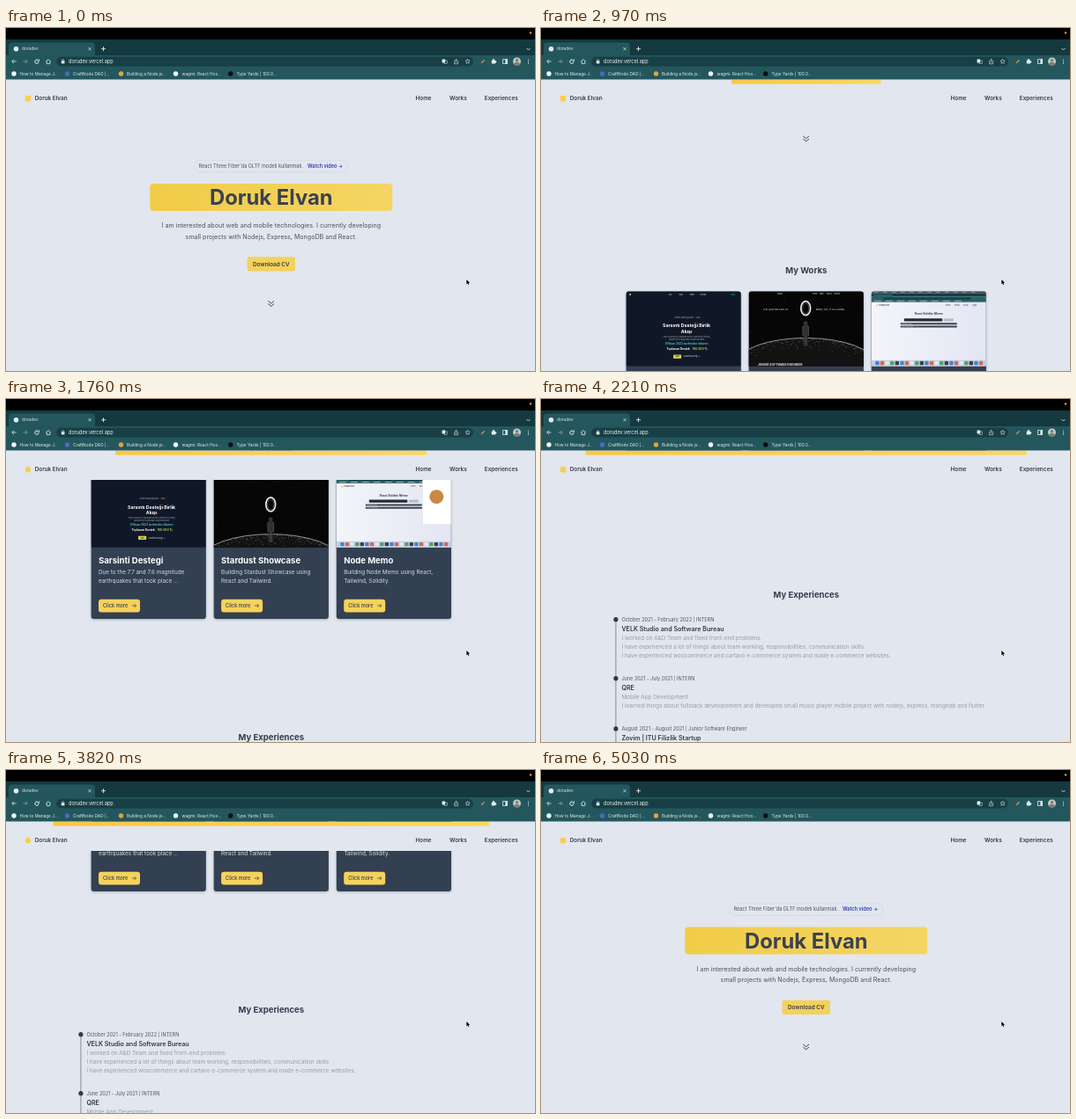
Write an HTML page with a canvas that moves like this. It is 600 by 390 pixels and loops after 5.06 s.

```html
<!DOCTYPE html>
<html lang="en">
<head>
<meta charset="utf-8">
<title>Portfolio scroll</title>
<style>
html, body { margin: 0; width: 100%; height: 100%; overflow: hidden; background: #e1e6ef; }
canvas { display: block; width: 600px; height: 390px; }
</style>
</head>
<body>
<canvas id="stage"></canvas>
<script>
const W = 600, H = 390, LOOP = 5060, CX = 300.8, MAX = 660;
const canvas = document.getElementById('stage');
const g = canvas.getContext('2d');
const dpr = window.devicePixelRatio || 1;
canvas.width = W * dpr;
canvas.height = H * dpr;

const BG = '#e1e6ef', INK = '#343d4d', SLATE = '#334052', YELLOW = '#f6d25b';
const K = 600 / 1512; // page pixels to stage pixels
const XS = 12 * K, SM = 14 * K, MD = 16 * K, LG = 18 * K, XL = 24 * K, HUGE = 60 * K;

// Monotone cubic through [time, value] points
function track(pts) {
  const n = pts.length;
  const d = pts.slice(1).map((p, i) => (p[1] - pts[i][1]) / (p[0] - pts[i][0]));
  const m = pts.map((p, i) => {
    if (i === 0 || i === n - 1) return 0;
    const a = d[i - 1], b = d[i];
    return a * b <= 0 ? 0 : 2 * a * b / (a + b);
  });
  return t => {
    if (t <= pts[0][0]) return pts[0][1];
    if (t >= pts[n - 1][0]) return pts[n - 1][1];
    let i = 0;
    while (t > pts[i + 1][0]) i++;
    const h = pts[i + 1][0] - pts[i][0], u = (t - pts[i][0]) / h, v = 1 - u;
    return pts[i][1] * (1 + 2 * u) * v * v + m[i] * h * u * v * v +
      pts[i + 1][1] * u * u * (3 - 2 * u) - m[i + 1] * h * u * u * v;
  };
}

const scrollAt = track([
  [0, 0], [60, 0], [300, 45], [550, 128], [800, 180], [925, 186], [970, 187.5],
  [1150, 250], [1315, 291.5], [1360, 301], [1550, 340], [1900, 451], [2165, 550],
  [2210, 565], [2400, 615], [2600, 634], [2850, 639], [3000, 648], [3150, 659],
  [3300, 662], [3450, 657], [3600, 625], [3775, 544.5], [3820, 516], [4000, 385],
  [4200, 195], [4360, 62], [4400, 40], [4500, 8], [4600, -4], [4700, -5], [5030, -1.5], [5060, -1]
]);

const roundAt = track([
  [0, .06], [350, 1], [650, 1], [900, 0], [970, 0], [1360, .93], [1800, 1], [2210, .07],
  [2500, .9], [2850, .96], [3150, 0], [3400, 0], [3820, .95], [4200, 1], [4500, 0], [4700, 0], [5030, .4]
]);

function txt(s, x, y, size, weight, color, align = 'left') {
  g.font = `${weight} ${size}px Inter, "Open Sans", sans-serif`;
  g.textAlign = align;
  g.fillStyle = color;
  g.fillText(s, x, y + size * .36); // y is the middle of the capitals
}

function rect(x, y, w, h, color) {
  g.fillStyle = color;
  g.fillRect(x, y, w, h);
}

function box(x, y, w, h, r, color) {
  g.beginPath();
  g.roundRect(x, y, w, h, r);
  g.fillStyle = color;
  g.fill();
}

function dot(x, y, r, color) {
  g.beginPath();
  g.arc(x, y, r, 0, 7);
  g.fillStyle = color;
  g.fill();
}

function line(color, width, ...paths) {
  g.strokeStyle = color;
  g.lineWidth = width;
  g.beginPath();
  for (const p of paths)
    for (let i = 0; i < p.length; i += 2) i ? g.lineTo(p[i], p[i + 1]) : g.moveTo(p[0], p[1]);
  g.stroke();
}

function ring(x, y, rx, ry, color, width) {
  g.beginPath();
  g.ellipse(x, y, rx, ry, 0, 0, 7);
  g.strokeStyle = color;
  g.lineWidth = width;
  g.stroke();
}

function ramp(x0, x1, a, b) {
  const c = g.createLinearGradient(x0, 0, x1, 0);
  c.addColorStop(0, a);
  c.addColorStop(1, b);
  return c;
}

function random(seed) {
  return () => (seed = seed * 16807 % 2147483647) / 2147483647;
}

function browser() {
  const strip = '#14393f', bar = '#23575d', light = '#e4eeee';
  rect(0, 0, W, 13, '#000');
  dot(595, 5.5, 1.2, '#e9963a');
  rect(0, 13, W, 18, strip);
  rect(0, 31, W, 27.5, bar);
  box(3, 16.5, 98, 16, 4, bar);
  dot(11.5, 23.7, 2.8, light);
  txt('dorudev', 18, 23.7, XS, 400, light);
  line(light, .7, [93.4, 22.1, 96.6, 25.3], [96.6, 22.1, 93.4, 25.3]);
  line(light, .9, [108, 23.7, 113, 23.7], [110.5, 21.2, 110.5, 26.2]);
  line(light, .8, [590.5, 23, 592.5, 25, 594.5, 23]);

  line(light, .8, [11.5, 38, 6.8, 38], [9, 35.8, 6.8, 38, 9, 40.2]);
  line('#86a6a9', .8, [19.5, 38, 24.2, 38], [22, 35.8, 24.2, 38, 22, 40.2]);
  g.beginPath();
  g.arc(35, 38.2, 2.2, -.4, 5.2);
  g.stroke();
  line(light, .8, [37.6, 35.4, 37.4, 37.4, 35.4, 37.4]);
  g.beginPath();
  g.arc(35, 38.2, 2.2, .3, 5.4);
  g.stroke();
  line(light, .8, [45.2, 38.2, 48, 35.6, 50.8, 38.2], [46.2, 37.6, 46.2, 40.6, 49.8, 40.6, 49.8, 37.6]);

  box(57, 32.8, 473, 10.8, 5.4, '#173f45');
  rect(62.8, 37.4, 3.6, 3, light);
  ring(64.6, 37.2, 1.1, 1.5, light, .6);
  txt('dorudev.vercel.app', 71, 38.1, SM, 400, '#f0f6f6');
  box(494.6, 35.6, 3.6, 4, .5, light);
  g.strokeStyle = light;
  g.lineWidth = .5;
  g.strokeRect(497, 37, 3.2, 3.6);
  line(light, .6, [509.4, 37.4, 508.6, 37.4, 508.6, 40.8, 512.6, 40.8, 512.6, 37.4, 511.8, 37.4],
    [510.6, 39.4, 510.6, 35.4], [509.4, 36.5, 510.6, 35.3, 511.8, 36.5]);
  g.beginPath();
  for (let i = 0; i < 11; i++) {
    const r = i % 2 ? 1.3 : 2.7, a = i * Math.PI / 5 - Math.PI / 2;
    g.lineTo(523.6 + r * Math.cos(a), 38.1 + r * Math.sin(a));
  }
  g.stroke();
  line('#e8934a', 1.3, [539.2, 39.8, 542.6, 36.4]);
  box(550.8, 36.4, 4.4, 4.2, .5, light);
  dot(553, 36.1, 1, light);
  dot(555.4, 38.5, 1, light);
  g.strokeStyle = light;
  g.lineWidth = .8;
  g.strokeRect(563.6, 35.7, 5, 4.8);
  rect(566.4, 35.7, 2.2, 4.8, light);
  g.save();
  g.beginPath();
  g.arc(579.5, 38, 4.5, 0, 7);
  g.clip();
  rect(574, 33, 11, 11, '#bccbc9');
  dot(579.5, 36.7, 1.7, '#87796d');
  dot(579.5, 42.4, 3.6, '#87796d');
  g.restore();
  for (const y of [36, 38.1, 40.2]) dot(592.5, y, .6, light);

  const marks = [
    [9, 15.5, '#f4f6f6', 'How to Manage J...'],
    [69.5, 76, '#4f68c0', 'CraftNode DAO |...'],
    [130.5, 137, '#e0a33d', 'Building a Node.js...'],
    [192.5, 199.5, '#f4f6f6', 'wagmi: React Hoo...'],
    [254.7, 261.5, '#0b0f10', 'Type Yards | 100.0...']
  ];
  for (const [ix, x, c, s] of marks) {
    dot(ix, 52, 2.7, c);
    txt(s, x, 52, XS, 400, light);
  }
}

function hero() {
  g.beginPath();
  g.roundRect(213.5, 150.3, 174.5, 13.6, 6.8);
  g.strokeStyle = '#cbd2dd';
  g.lineWidth = .5;
  g.stroke();
  txt("React Three Fiber'da GLTF modeli kullanmak.", 218.5, 157, SM, 400, '#4c5564');
  txt('Watch video →', 342, 157, SM, 600, '#3040b4');
  box(163.3, 177, 275, 31, 4, ramp(163, 438, '#f1cc48', '#f4d564'));
  txt('Doruk Elvan', CX, 192.6, HUGE, 700, '#3a4250', 'center');
  txt('I am interested about web and mobile technologies. I currently developing', CX, 224.5, LG, 400, '#4a5362', 'center');
  txt('small projects with Nodejs, Express, MongoDB and React.', CX, 237.3, LG, 400, '#4a5362', 'center');
  box(273.6, 260.2, 54.4, 16.4, 2.4, '#f3d15c');
  txt('Download CV', CX, 268.4, MD, 600, INK, 'center');
  line('#2f3642', .9, [297.4, 310.4, 300.7, 313.2, 304, 310.4], [297.4, 313.6, 300.7, 316.4, 304, 313.6]);
}

function reliefShot() {
  rect(0, 0, 130, 86, '#101827');
  dot(4.5, 3.5, 1, '#cbd2da');
  ['Ana', 'Ekip', 'Yayın', 'Destek'].forEach((s, i) => txt(s, 48 + i * 12, 3.4, 2, 500, '#c4ccd5'));
  txt('Giriş', 119, 3.4, 2, 500, '#36b3b6');
  txt('Birlikte daha güçlüyüz', 66, 29.6, 2.1, 400, '#a7b0bc', 'center');
  txt('canlı', 79, 29.6, 2.1, 500, '#d98143');
  txt('Sarsıntı Desteği Birlik', 68.5, 39, 5.2, 700, '#fff', 'center');
  txt('Akışı', 68.5, 45.4, 5.2, 700, '#fff', 'center');
  txt('Yayın boyunca toplanan bütün destekler ihtiyaç', 68.5, 51.6, 2.4, 400, '#97a1af', 'center');
  txt('sahiplerine doğrudan ulaştırılacaktır', 68.5, 54.6, 2.4, 400, '#97a1af', 'center');
  txt('9 Nisan 2023 tarihinden itibaren', 68.5, 59.6, 3.1, 700, '#4cc3cc', 'center');
  txt('Toplanan Destek:', 46, 65.4, 3.2, 700, '#fff');
  txt('100.000 TL', 75, 65.4, 3.2, 700, '#b9d552');
  box(53.5, 72, 9, 4.4, .6, '#e3d34e');
  txt('Katıl', 58, 74.2, 2, 600, '#222', 'center');
  txt('Daha fazla bilgi →', 65, 74.2, 2.2, 500, '#c4ccd5');
}

function spaceShot(t) {
  const d = 17 * Math.min(1, Math.max(0, (t - 970) / 390));
  rect(0, 0, 130, 86, '#060606');
  const rnd = random(77);
  for (let i = 0; i < 60; i++) rect(rnd() * 130, rnd() * 70, .45, .45, '#777');
  txt('Studio', 32, 3.2, 2, 500, '#ccc');
  ['Home', 'Skills', 'Works', 'Contact'].forEach((s, i) => txt(s, 72 + i * 8, 3.2, 2, 500, '#ccc'));
  if (d < 8) {
    txt('THE QUIETER SIDE OF', 16, 20.6, 2.7, 600, '#aaa');
    txt('MIND, YET, IT IS LOUDER', 76, 20.6, 2.7, 600, '#aaa');
  }
  g.save();
  g.translate(0, d);
  g.beginPath();
  g.ellipse(64.5, 82, 78, 29, 0, 0, 7);
  g.fillStyle = '#121212';
  g.fill();
  g.beginPath();
  g.ellipse(64.5, 82, 78, 29, 0, Math.PI * 1.13, Math.PI * 1.87);
  g.strokeStyle = '#b5b5b5';
  g.lineWidth = .8;
  g.stroke();
  for (let i = 0; i < 180; i++) {
    const x = rnd() * 130, q = (x - 64.5) / 78;
    const top = 82 - 29 * Math.sqrt(1 - q * q);
    rect(x, top + rnd() * rnd() * 15, .6, .5, '#a0a0a0');
  }
  ring(64.5, 19.2, 5.4, 8, '#e9e9e9', 1.7);
  ring(64.5, 19.2, 3.6, 6, '#777', .6);
  dot(64.5, 36.2, 2.4, '#343434');
  box(61.2, 38.5, 6.6, 12, 2, '#303030');
  rect(62.2, 49, 2, 13.2, '#303030');
  rect(65, 49, 2, 13.2, '#303030');
  line('#8a8a8a', .4, [61.2, 51, 61.2, 40, 63, 38.5], [67.8, 51, 67.8, 40, 66, 38.5], [64.6, 50, 64.6, 62]);
  g.restore();
  if (d < 8) txt('JUNIOR SOFTWARE ENGINEER', 10, 83.8, 3.4, 700, '#e6e6e6');
}

function todoShot(t) {
  rect(0, 0, 130, 86, ramp(0, 130, '#f4f5fa', '#e3e6f3'));
  rect(0, 0, 130, 2.2, '#39414c');
  rect(0, 2.2, 130, 4, '#173f45');
  rect(0, 6.2, 130, 6, '#286067');
  box(2, 3.2, 22, 4, .8, '#286067');
  box(13, 7, 100, 2.3, 1.1, '#173f45');
  for (let i = 0; i < 12; i++) rect(3 + i * 10, 1, 5, .5, '#b5bdc4');
  for (let i = 0; i < 8; i++) rect(3 + i * 13, 10.4, 8, .7, '#b9cccd');
  dot(6.5, 16, .9, '#e9c649');
  txt('Doruk Elvan', 8.5, 16, 2, 600, '#444');
  ['Home', 'Works', 'About', 'Login'].forEach((s, i) => txt(s, 84 + i * 10, 16, 2, 500, '#555'));
  txt('React Solidity Memo', 65, 25.8, 3.2, 700, '#333b49', 'center');
  box(37, 30.8, 43.5, 3.2, .6, '#252b35');
  box(82, 30.8, 11, 3.2, .6, '#b6bdca');
  box(33, 35.8, 64, 2, .5, '#3a4250');
  box(33, 39, 64, 2, .5, '#3a4250');
  txt('Read the notes', 35, 36.8, 1.6, 400, '#ddd');
  txt('Buy some bread', 35, 40, 1.6, 400, '#ddd');
  rect(0, 78.2, 130, 7, '#c6ccdd');
  for (let i = 0; i < 22; i++)
    box(4.5 + i * 5.6, 79.4, 4.3, 4.3, 1, ['#3e82d8', '#e3e7ec', '#38414d', '#d8684d', '#4ba36d'][i * 3 % 5]);
  if (t > 1150) {
    box(97.5, 6, 32.5, 53, .8, '#fff');
    g.strokeStyle = '#cfd3da';
    g.lineWidth = .4;
    g.strokeRect(97.5, 6, 32.5, 53);
    dot(113.5, 27.5, 8, '#c98843');
    txt('...', 120, 53, 2.4, 500, '#888', 'center');
  }
}

const cards = [
  [96.6, reliefShot, 'Sarsinti Destegi', 'Due to the 7.7 and 7.6 magnitude', 'earthquakes that took place ...'],
  [235.7, spaceShot, 'Stardust Showcase', 'Building Stardust Showcase using', 'React and Tailwind.'],
  [374.8, todoShot, 'Node Memo', 'Building Node Memo using React,', 'Tailwind, Solidity.']
];

function works(t) {
  txt('My Works', CX, 463.6, XL, 700, INK, 'center');
  for (const [x, shot, title, a, b] of cards) {
    g.save();
    g.translate(x, 487);
    g.shadowColor = 'rgba(30,40,60,.3)';
    g.shadowBlur = 3 * dpr;
    g.shadowOffsetY = dpr;
    box(0, 0, 130.2, 166.4, 3, SLATE);
    g.shadowColor = 'transparent';
    g.save();
    g.beginPath();
    g.roundRect(0, 0, 130.2, 85, [3, 3, 0, 0]);
    g.clip();
    shot(t);
    g.restore();
    txt(title, 8.4, 99.8, XL, 700, '#fff');
    txt(a, 8.4, 113.5, MD, 400, '#d3d9e1');
    txt(b, 8.4, 123.5, MD, 400, '#d3d9e1');
    box(8.4, 144, 47, 14.8, 3, YELLOW);
    txt('Click more', 13.4, 151.4, SM, 500, INK);
    line(INK, .7, [46.2, 151.4, 51, 151.4], [49, 149.4, 51, 151.4, 49, 153.4]);
    g.restore();
  }
}

const jobs = [
  [816, 'October 2021 - February 2022 | INTERN', 'VELK Studio and Software Bureau',
    'I worked on A&D Team and fixed front-end problems.',
    'I have experienced a lot of things about team working, responsibilities, communication skills',
    'I have experienced woocommerce and cartavo e-commerce system and made e-commerce websites.'],
  [883, 'June 2021 - July 2021 | INTERN', 'QRE',
    'Mobile App Development',
    'I learned things about fullstack developement and developed small music player mobile project with nodejs, express, mongodb and flutter'],
  [940.2, 'August 2021 - August 2021 | Junior Software Engineer', 'Zovim | ITU Filizlik Startup',
    'Machine Learning Research with NVC ModelYard',
    'Mobile App Development with React Native, Nimbor Web Services (NVC Relay52, Liftora)']
];

function experiences() {
  txt('My Experiences', CX, 787.6, XL, 700, INK, 'center');
  line('#6d7480', .8, [84.9, 816, 84.9, 992]);
  for (const [y, date, title, ...rows] of jobs) {
    dot(84.9, y, 2.6, '#333a47');
    txt(date, 91.4, y, SM, 400, '#505866');
    txt(title, 91.4, y + 10.5, LG, 600, '#333b49');
    rows.forEach((s, i) => txt(s, 91.4, y + 21 + i * 9.9, MD, 400, '#979eaa'));
  }
}

function nav(t) {
  const w = Math.min(1, Math.max(0, scrollAt(t - 45) / MAX)) * W;
  rect(0, 58.5, W, 33.5, BG);
  if (w > 0) rect(CX - w / 2, 58.7, w, 5, ramp(CX - w / 2, CX + w / 2, '#fac646', '#fdd660'));
  const r = roundAt(t), s = 6.4;
  g.save();
  g.translate(25, 80.2);
  g.rotate(r * Math.PI);
  box(-s / 2, -s / 2, s, s, r * s / 2, '#f8cf50');
  g.restore();
  txt('Doruk Elvan', 32.8, 80, MD, 600, INK);
  txt('Home', 464.6, 80, MD, 600, INK);
  txt('Works', 503, 80, MD, 600, INK);
  txt('Experiences', 542.8, 80, MD, 600, INK);
}

function cursor() {
  const p = [0, 0, 0, 5.4, 1.2, 4.3, 2.1, 6.3, 3, 5.9, 2.1, 3.9, 3.8, 3.8];
  g.beginPath();
  for (let i = 0; i < p.length; i += 2) g.lineTo(522.3 + p[i], 286 + p[i + 1]);
  g.closePath();
  g.strokeStyle = '#fff';
  g.lineWidth = 1;
  g.stroke();
  g.fillStyle = '#000';
  g.fill();
}

function draw(t) {
  g.setTransform(dpr, 0, 0, dpr, 0, 0);
  rect(0, 0, W, H, BG);
  g.save();
  g.translate(0, -scrollAt(t));
  hero();
  works(t);
  experiences();
  g.restore();
  nav(t);
  browser();
  cursor();
}

const start = performance.now();
function tick() {
  draw((performance.now() - start) % LOOP);
  requestAnimationFrame(tick);
}
tick();
</script>
</body>
</html>
```
